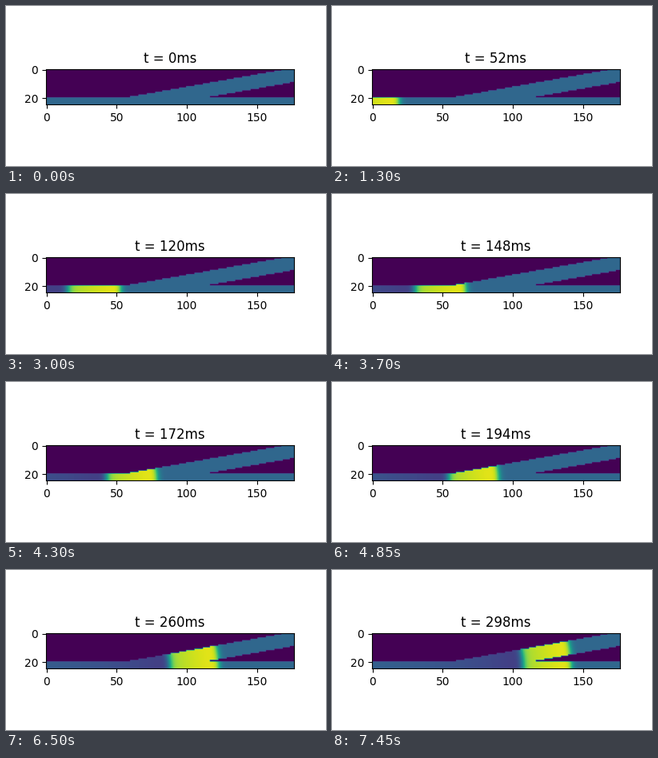
These frames come from a looping animation (400 px wide and 200 px high, 7500 ms). A matplotlib script:

```python
import numpy as np
import matplotlib.pyplot as plt
from matplotlib.animation import FuncAnimation

ROWS, COLS = 25, 177
FRAMES, INTERVAL, STEP_MS = 150, 50, 2
VMIN, VMAX, REST = -2.8, 2.0, -1.2
RUN = 1 / np.tan(np.radians(10))  # columns per row along the branch
SPEED = 0.5                       # columns per ms

row, col = np.mgrid[:ROWS, :COLS].astype(float)

# Straight fibre along the bottom with a branch rising at 10 degrees
rise = (19 - row) * RUN
tissue = (row >= 20) | ((col >= 60 + rise) & (col < 117 + rise))

# Wave fronts bend backwards with height once the tissue widens
height = ROWS - 1 - row
bend = 0.7 * height**2 / np.maximum(col - 31, 24)
path = col + bend * np.clip((col - 55) / 15, 0, 1)

# Arrival of the front, and of the back one pulse length later, in ms
front = 14 + path / SPEED
back = front + 74 - 0.04 * path + 8 * np.exp(-path / 15)


def sigmoid(x):
    return 0.5 * (1 + np.tanh(x / 2))


def potential(t):
    """Membrane potential: upstroke, sagging plateau, slow recovery."""
    p = np.clip((t - front) / (back - front), 0, 1)
    plateau = 1.89 - 0.45 * p - 0.2 * p**3
    u = np.maximum(t - back, 0) * 0.0075
    recovery = -0.78 * np.exp(-0.8 * u - 0.24 * u**2)
    on, off = sigmoid((t - front) / 2.5), sigmoid((t - back) / 2.7)
    v = REST + on * (1 - off) * (plateau - REST) + off * recovery
    return np.where(tissue, v, VMIN)


fig, ax = plt.subplots(figsize=(4, 2), dpi=100)
image = ax.imshow(potential(0), vmin=VMIN, vmax=VMAX, cmap="viridis")
title = ax.set_title("t = 0ms")


def update(i):
    t = i * STEP_MS
    image.set_data(potential(t))
    title.set_text(f"t = {t}ms")
    return image, title


anim = FuncAnimation(fig, update, frames=FRAMES, interval=INTERVAL,
                     repeat=True, repeat_delay=0, blit=False)
plt.show()
```
